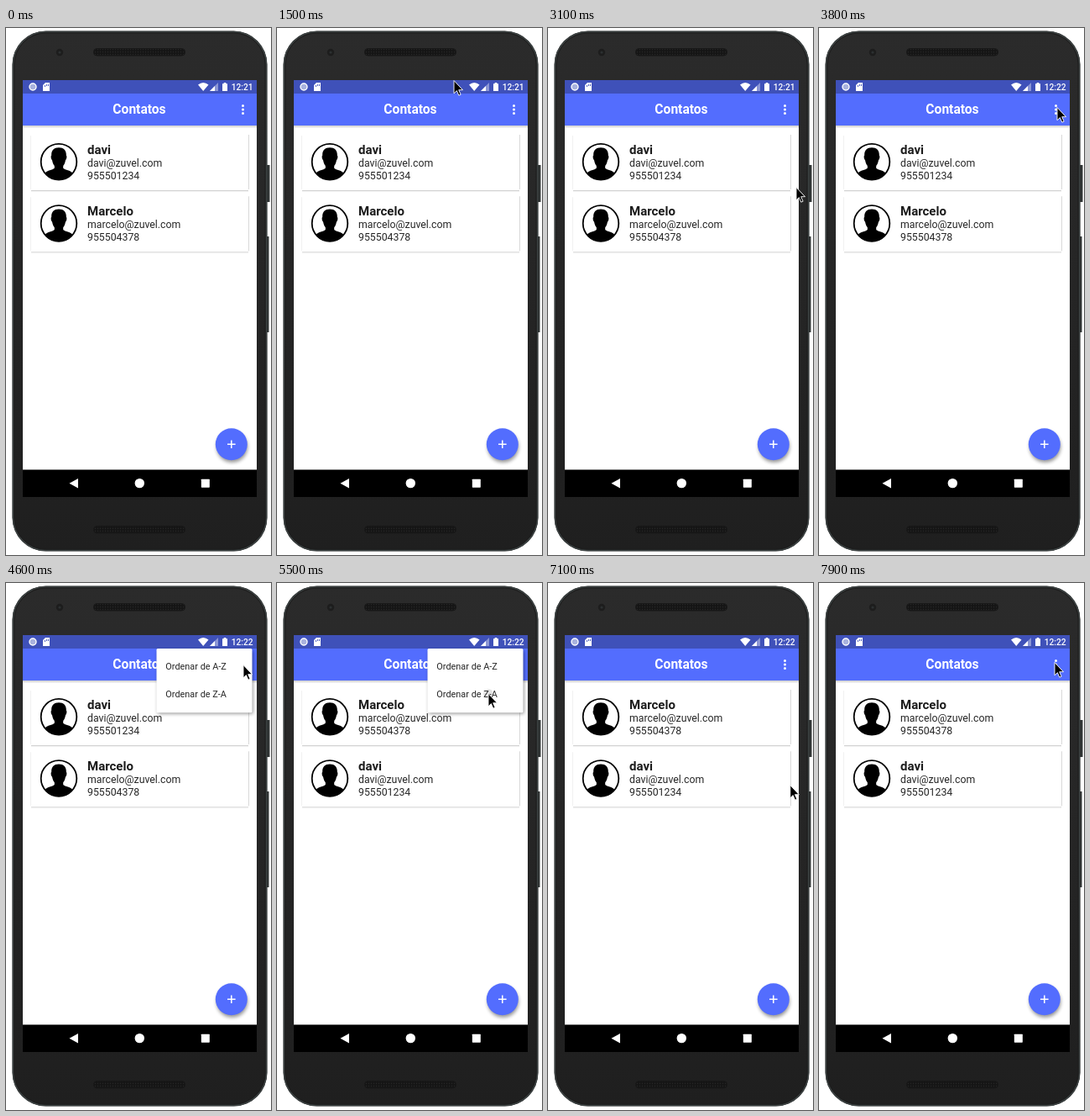
Recreate the animation shown at these times as an HTML page. Size 316x627 px, loop 8000 ms.

```html
<!DOCTYPE html>
<html lang="pt">
<head>
<meta charset="utf-8">
<title>Contatos</title>
<style>
  html, body { margin: 0; width: 100%; height: 100%; overflow: hidden; background: #fff; }
  svg { display: block; width: 100%; height: 100%; }
  text { font-family: Roboto, sans-serif; fill: #262626; }
  .title { font-size: 15.6px; font-weight: 600; fill: #fff; text-anchor: middle; }
  .clock { font-size: 10.2px; font-weight: 500; fill: #fff; }
  .name { font-size: 15px; font-weight: 600; fill: #1c1c1c; }
  .info { font-size: 12.3px; }
  .item { font-size: 10.9px; }
</style>
</head>
<body>
<svg viewBox="0 0 316 627">
  <defs>
    <linearGradient id="body" x1="0" y1="0" x2="0" y2="1">
      <stop offset="0" stop-color="#2b2b2b"/>
      <stop offset=".5" stop-color="#252525"/>
      <stop offset="1" stop-color="#1f1f1f"/>
    </linearGradient>
    <linearGradient id="drop" x1="0" y1="0" x2="0" y2="1">
      <stop offset="0" stop-color="#000" stop-opacity=".2"/>
      <stop offset="1" stop-color="#000" stop-opacity="0"/>
    </linearGradient>
    <pattern id="mesh" width="3" height="3" patternUnits="userSpaceOnUse">
      <rect width="3" height="3" fill="#151515"/>
      <circle cx="1.5" cy="1.5" r=".7" fill="#272727"/>
    </pattern>
    <filter id="soft" x="-30%" y="-30%" width="160%" height="160%"><feGaussianBlur stdDeviation="1.9"/></filter>
    <clipPath id="screen"><rect x="20" y="62" width="279" height="496"/></clipPath>
    <clipPath id="face"><circle r="21"/></clipPath>
    <g id="card">
      <rect x="29" y="123.5" width="260.5" height="70" rx="1.5" fill="#fff"/>
      <path d="M29.5 128V192" stroke="#f1f1f1"/>
      <path d="M289.5 127V192" stroke="#d9d9d9"/>
      <path d="M30 193.5H289" stroke="#d2d2d2"/>
      <path d="M30 194.5H289" stroke="#f3f3f3"/>
      <g transform="translate(63 159.2)">
        <circle r="21.3" fill="#fff" stroke="#000" stroke-width="1.8"/>
        <path clip-path="url(#face)" d="M0-17C6-17 9.200-13.500 8.800-7.500C10-7 9.200-2.500 8-2C7.500 1 6.500 3.200 5.200 4.800V7.500C7.500 10 14 10 16 13C17 14.800 17.400 18 17.600 23H-17.600C-17.400 18-17 14.800-16 13C-14 10-7.500 10-5.200 7.500V4.800C-6.500 3.200-7.500 1-8-2C-9.200-2.500-10-7-8.800-7.500C-9.200-13.500-6-17 0-17Z"/>
      </g>
    </g>
  </defs>

  <rect width="316" height="627" fill="#fff"/>
  <path d="M310 163h4.500v44H310zM309 248h4.500v114H309z" fill="#303434"/>
  <rect x="7.500" y="3.500" width="304" height="619" rx="40" fill="url(#body)"/>
  <rect x="8.500" y="4.500" width="302" height="617" rx="39" fill="none" stroke="#3b4141" stroke-width="1.600"/>
  <rect x="10" y="6" width="299" height="614" rx="37.500" fill="none" stroke="#1c1c1c"/>
  <circle cx="64" cy="29" r="4.200" fill="#1d1d1d"/>
  <circle cx="64" cy="29" r="1.600" fill="#2c3031"/>
  <g fill="url(#mesh)" stroke="#181818">
    <rect x="104.500" y="24.500" width="109" height="8.500" rx="4"/>
    <rect x="104.500" y="592.500" width="109" height="8.500" rx="4"/>
  </g>

  <g clip-path="url(#screen)">
    <rect x="20" y="62" width="279" height="496" fill="#fff"/>
    <rect x="20" y="116" width="279" height="3.500" fill="url(#drop)"/>
    <rect x="20" y="62" width="279" height="16" fill="#3f51b9"/>
    <rect x="20" y="78" width="279" height="38" fill="#536dfe"/>

    <circle cx="32" cy="70" r="4" fill="#a9b2de" stroke="#fff" stroke-width="1.400"/>
    <path d="M47 65H52V75H44V68Z" fill="#fff"/>
    <path d="M46.500 68v2M48.500 67v2M50.500 67v2" stroke="#3f51b9" stroke-width=".9"/>
    <path d="M229 67.500Q235.200 62.500 241.500 67.500L235.200 75Z" fill="#fff"/>
    <path d="M253 65V75H243Z" fill="#fff" opacity=".4"/>
    <path d="M249 69V75H243Z" fill="#fff"/>
    <path d="M258 66.200H259.700V65H262.300V66.200H264V75H258Z" fill="#fff"/>
    <text id="clock" class="clock" x="268.700" y="73.800">12:21</text>

    <text class="title" x="159" y="102">Contatos</text>
    <g fill="#fff">
      <circle cx="282.500" cy="92.400" r="1.500"/>
      <circle cx="282.500" cy="97" r="1.500"/>
      <circle cx="282.500" cy="101.600" r="1.500"/>
    </g>
    <circle id="tap" cx="282.500" cy="97" fill="#000"/>

    <use href="#card"/>
    <use href="#card" y="73.300"/>
    <g id="first">
      <text class="name" x="97" y="150">davi</text>
      <text class="info" x="97" y="165">davi@zuvel.com</text>
      <text class="info" x="97" y="179.800">955501234</text>
    </g>
    <g id="second">
      <text class="name" x="97" y="150">Marcelo</text>
      <text class="info" x="97" y="165">marcelo@zuvel.com</text>
      <text class="info" x="97" y="179.800">955504378</text>
    </g>

    <circle cx="269.600" cy="498.300" r="18.500" opacity=".42" filter="url(#soft)"/>
    <circle cx="268.800" cy="495.300" r="19" fill="#536dfe"/>
    <path d="M264 495.300h9.600M268.800 490.500v9.600" stroke="#fff" stroke-width="1.500"/>

    <g id="menu">
      <rect x="181" y="80.500" width="113.500" height="75" opacity=".42" filter="url(#soft)"/>
      <rect x="179.500" y="78" width="114" height="76.300" rx="1.500" fill="#fff"/>
      <circle id="ripple" cx="252" cy="132" fill="#000" opacity=".1"/>
      <text class="item" x="190.300" y="103">Ordenar de A-Z</text>
      <text class="item" x="190.300" y="136">Ordenar de Z-A</text>
    </g>

    <rect x="20" y="525.500" width="279" height="32.500"/>
    <path d="M86 536V547.500L75.500 541.700Z" fill="#fff"/>
    <circle cx="159.300" cy="541.600" r="5.700" fill="#fff"/>
    <rect x="232.800" y="536.700" width="10" height="10" rx=".6" fill="#fff"/>
  </g>

  <path id="cursor" d="M0-.5V14.800L3.400 11.600L5.800 17.200L8.100 16.200L5.700 10.700H10.500Z" fill="#000" stroke="#fff" stroke-width=".9"/>
</svg>
<script>
const LOOP = 8000, STEP = 100;
const $ = id => document.getElementById(id);
const clamp = v => Math.min(1, Math.max(0, v));
const phase = (t, from, to) => clamp((t - from) / (to - from));
const easeOut = p => 1 - (1 - p) ** 3;
const show = (el, on) => el.setAttribute('visibility', on ? 'visible' : 'hidden');

// Pointer path: time, x, y
const path = [
  [400, 18, 0], [1200, 183, 61], [1500, 211, 63], [1700, 216, 90], [2100, 190, 175],
  [2400, 250, 266], [2600, 286, 238], [2700, 286, 238], [3100, 296, 190], [3600, 285, 101],
  [3800, 284, 95], [4500, 284, 95], [4600, 283, 98], [5200, 252, 132], [5700, 252, 132],
  [6200, 252, 185], [6400, 248, 325], [6700, 248, 325], [7200, 299, 220], [7600, 281, 103],
  [7900, 281, 95], [8000, 281, 95]
];

function pointer(t) {
  const i = Math.max(1, path.findIndex(p => p[0] >= t));
  const [a, b] = [path[i - 1], path[i]];
  const k = phase(t, a[0], b[0]);
  return [a[1] + (b[1] - a[1]) * k, a[2] + (b[2] - a[2]) * k];
}

function render(t) {
  show($('cursor'), t >= 400);
  $('cursor').setAttribute('transform', `translate(${pointer(t)})`);
  $('clock').textContent = t < 3700 ? '12:21' : '12:22';

  const swapped = t >= 5400;
  $('first').setAttribute('transform', `translate(0 ${swapped ? 73.3 : 0})`);
  $('second').setAttribute('transform', `translate(0 ${swapped ? 0 : 73.3})`);

  const tap = phase(t, 4000, 4400);
  $('tap').setAttribute('r', 24 * easeOut(tap));
  $('tap').setAttribute('opacity', .14 * (1 - tap));

  const grow = easeOut(phase(t, 4050, 4400));
  const fade = 1 - easeOut(phase(t, 5700, 6150));
  const menu = $('menu');
  show(menu, grow > 0 && fade > 0);
  menu.setAttribute('opacity', grow * fade);
  menu.setAttribute('transform', `translate(293.5 78) scale(${grow}) translate(-293.5 -78)`);
  $('ripple').setAttribute('r', 6 * phase(t, 5300, 5500));
}

const start = performance.now();
function tick() {
  const t = (performance.now() - start) % LOOP;
  render(Math.floor(t / STEP) * STEP);
  requestAnimationFrame(tick);
}
tick();
</script>
</body>
</html>
```
